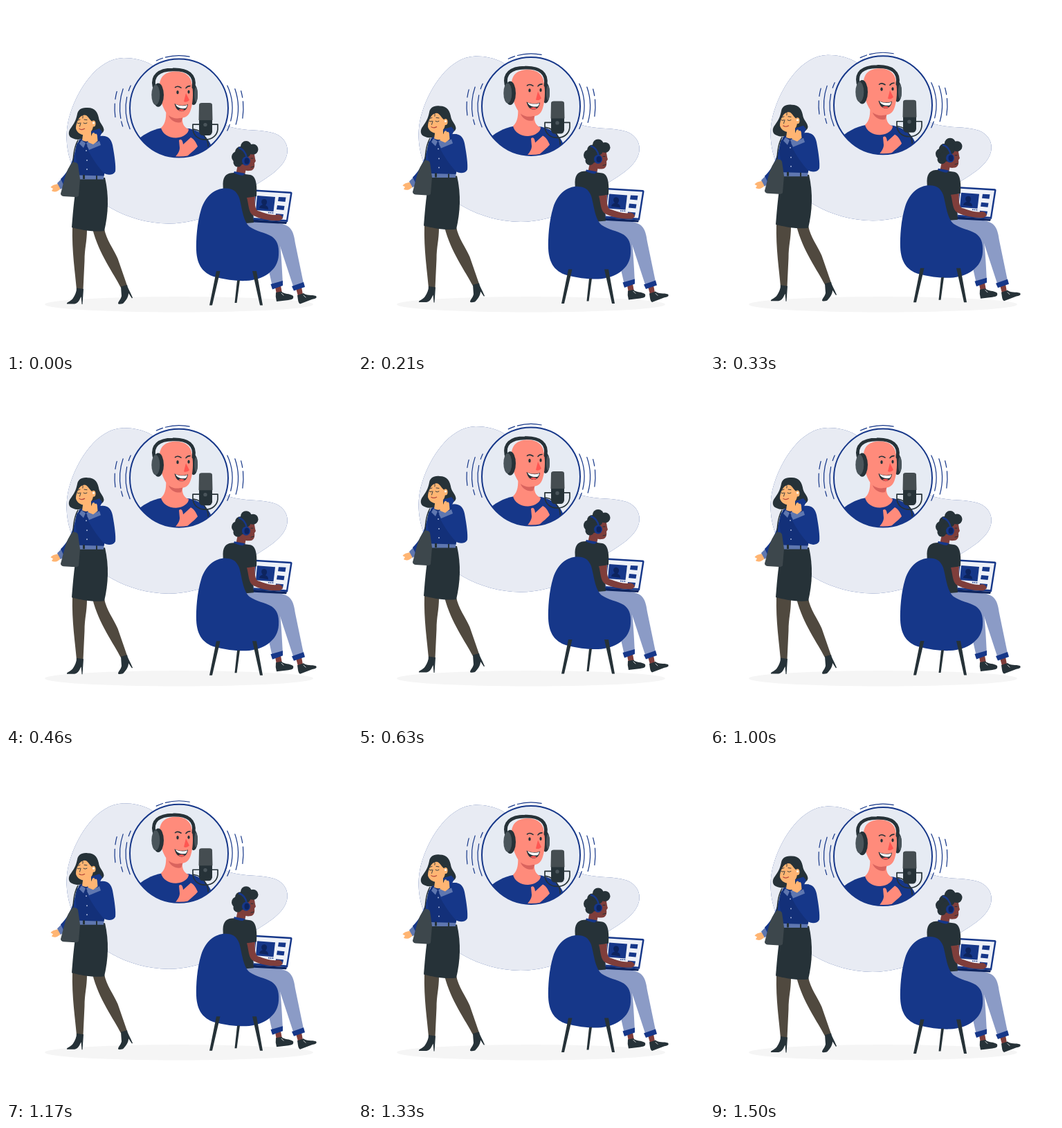
An HTML page for the animation above (1540 ms loop, 500x500 px).

```html
<!DOCTYPE html>
<html lang="en">
<head>
<meta charset="utf-8">
<title>Podcast listeners</title>
<style>
html, body { margin: 0; width: 100%; height: 100%; overflow: hidden; background: #fff; }
svg { display: block; width: 100vw; height: 100vh; }
.blue { fill: #163789; }
.shade { fill: #133079; }
.navy { fill: #0d245f; }
.dark { fill: #263238; }
.gray { fill: #4a555b; }
.cuff { fill: #5f77b0; }
.pants { fill: #8b9bc6; }
.tights { fill: #50493f; }
.pink { fill: #ff8b7b; }
.tan { fill: #ffb573; }
.brown { fill: #7f3e3b; }
.line { fill: none; stroke: #263238; stroke-linecap: round; stroke-linejoin: round; }
.lace { fill: none; stroke: #fff; stroke-width: .8; stroke-linecap: round; }
#waves { fill: none; stroke: #163789; stroke-width: 1.2; stroke-linecap: round; }
</style>
</head>
<body>
<svg viewBox="0 0 500 500">
  <defs>
    <clipPath id="disc"><circle cx="250" cy="147.500" r="71"/></clipPath>
    <path id="blob" d="M170 75C185 75 197 78 207 83C248 105 285 162 325 175C345 181 371 178 388 184C404 190 409 204 406 215C400 238 372 250 350 266C320 292 285 314 235 314.500C175 314 121 281 101 243C86 214 84 182 93 155C104 121 131 76 170 75Z"/>
  </defs>
  <ellipse cx="250" cy="431.300" rx="194" ry="11.200" fill="#f5f5f5"/>

  <g id="scene">
    <use href="#blob" class="blue"/>
    <use href="#blob" fill="#fff" opacity=".9"/>
    <path id="waves"/>

    <!-- host -->
    <circle cx="250" cy="147.500" r="71" fill="#e6ebf3"/>
    <g clip-path="url(#disc)">
      <path class="blue" d="M185 198C197 186 210 179 226 176L265 177C281 181 292 189 297 203L302 225H180Z"/>
      <path class="pink" d="M231 146C232 160 231 170 224 176C226 185 236 191 246 190.500C256 190 264 184 264 178C256 175 254 168 255 158Z"/>
      <path d="M235 158C241 163 250 164 256 160L253 168C246 170 237 165 235 158Z" fill="#d9645e"/>
      <ellipse class="dark" cx="271" cy="128" rx="6" ry="15"/>
      <ellipse class="gray" cx="274.500" cy="128" rx="2.400" ry="11"/>
      <path class="pink" d="M222 115C222 101 232 94.500 245 94.500C260 94.500 268 102 269 115C271 126 270 141 267 150C264 160 258 162.500 250 161.500C240 160 232 157 229 150C224 140 222 130 222 115Z"/>
      <path class="line" stroke-width="4.800" d="M214 116C211 101 220 92 241 91.800C263 91 274 100 271 117"/>
      <ellipse class="dark" cx="220" cy="128.500" rx="8" ry="17.200"/>
      <ellipse class="gray" cx="216.300" cy="128.500" rx="6" ry="14.500"/>
      <ellipse class="dark" cx="248" cy="124.500" rx="1.700" ry="2.700"/>
      <ellipse class="dark" cx="264" cy="124" rx="1.600" ry="2.600"/>
      <path class="line" stroke-width="1.600" d="M244.500 117.500Q248 114.500 253 118M260 118.500Q262 115.500 266 115.500"/>
      <path d="M260 126L265 136Q261 140 257 138Z" fill="#ff5652"/>
      <path class="dark" d="M243.500 141C250 144 257 144.500 263 142C262 149 258 153 252 152C247 150.500 245 147 243.500 141Z"/>
      <path d="M245 142C251 144.500 257 145 262 143C261.500 146 260 148 258 148C252 148.500 247 146.500 245 142Z" fill="#fff"/>
      <path d="M249 150C253 148 257 149 258 150.500C256 152.500 252 152.500 249 150Z" fill="#ff5652"/>
      <path class="line" stroke-width="1.700" d="M279 171H270V178C271 188 279 193 288 193C298 193 305 187 306 178V171H298"/>
      <path class="line" stroke-width="1.700" d="M271 178C281 179 286 185 290 193Q293 199 292 207"/>
      <path class="dark" d="M279 163H298V182Q297 187 293 187H284Q280 187 279 182Z"/>
      <path d="M279 143Q279 140 283 140H294Q298 140 298 143L298.500 165H278.500Z" fill="#454d51"/>
      <circle class="gray" cx="288" cy="171.500" r="2.700"/>
      <path class="pink" d="M250 194C253 191 255.500 194 256 200L267 190C272 192 275 198 277 203C273 208 266 213 260 219H244C248 214 251 210 251 205Z"/>
    </g>
    <circle cx="250" cy="147.500" r="71" fill="none" stroke="#163789" stroke-width="2"/>

    <!-- walking listener -->
    <path class="tights" d="M96 319L117 323C117 341 113.500 350 113.500 368L111.500 410H102C100 385 95 355 96 319Z"/>
    <path class="tights" d="M123 322L142 322C145 338 155 350 161.500 365L175 404L166 407C156 387 134 358 125 322Z"/>
    <path class="dark" d="M102 407.500L112 409L110.500 431H109.500L108.500 420C106 425 104 430 99 430.500H88C87 428 94 427 97 422C100 417 102 413 102 407.500Z"/>
    <path class="dark" d="M166 405.500L175 403C176 408 179 412 183 421.500L182 422.300L177 415C177 421 173 426 169 430C166 431 162 431 162 430C162 427 166 424 167 419Z"/>
    <path class="tan" d="M78 256C73 258 67 258 64.500 262L68 264L66 267C70 270 75 268 79 264Z"/>
    <path class="cuff" d="M74 256L79 265L86 259L80 250Z"/>
    <path class="blue" d="M103 196C99 212 96 234 79 250L85 262C96 252 106 240 111 220Z"/>
    <path class="dark" d="M118 147C109 146 104 150 103 156C101 166 98 170 94 176C89 182 90 189 96 191C102 194 110 193 116 190L128 187C134 188 141 184 141.500 179C141 173 136 170 134.500 164C133 154 129 147 118 147Z"/>
    <path class="shade" d="M106 193C112 190 132 187 143 188L146 225L141 248H105C104 234 99 217 101 204Z"/>
    <path class="tan" d="M112 180L123 178L123 193Q117 198 110 194Z"/>
    <path class="tan" d="M104 165C107 159 112 156 116 158C120 161 122 166 126 168C127 176 124 183 117 186C110 188 102 183 101 177C101 172 102 169 104 165Z"/>
    <ellipse class="tan" cx="126.500" cy="170" rx="3" ry="4.500"/>
    <path class="line" stroke-width=".9" d="M103 169Q105 170.500 107 169M112 169Q114 171 117 169M104 165L107 164M113 164L117 164.500M108 169L106.500 174M110 156Q112 160 111 162"/>
    <path d="M105.500 177Q109 180 114 177" fill="none" stroke="#b5483b" stroke-width="1.200"/>
    <circle cx="126.500" cy="169" r="1.500" fill="#fff"/>
    <path class="cuff" d="M109 194L115 198L112 205L106 199ZM116 198L124 192L128 199L119 205Z"/>
    <path class="blue" d="M136 188C146 186 152 191 154 201C157 217 159 232 158 239C155 245 146 245 141 241C133 232 124 220 118 207L134 200Z"/>
    <path class="cuff" d="M117 202L135 195L137 201L120 208Z"/>
    <path class="blue" d="M123 181L135 177L139 182L132 197L126 195Z"/>
    <path class="tan" d="M118 194C121 191 123 189 124 186C125 182 128 182 128.500 185C131 183 132 186 132 189L132.500 195L126 200L119 197Z"/>
    <g fill="#aab8dc"><circle cx="116" cy="209" r="1"/><circle cx="117" cy="223" r="1"/><circle cx="117" cy="236" r="1"/></g>
    <path class="dark" d="M104 248H143C149 274 148 300 142 325C124 327 107 323 95 320C97 295 99 270 104 248Z"/>
    <path class="cuff" d="M105 244.500L141 245.500V250.500H104.500Z"/>
    <path class="dark" d="M111 244H114V250H111ZM130 245H132V251H130Z"/>
    <path class="line" stroke-width="1.500" d="M104 194C98 204 97 216 97 230"/>
    <path d="M96 226C99 225 103 226 104 229L107 250L105 274Q104 276 100 276L83 275Q79 274 79 271C84 254 86 237 96 226Z" fill="#3d474c"/>

    <!-- seated listener -->
    <path class="pants" d="M372 325L396 345C398 362 399 382 400 401L385 405.500L377 370Z"/>
    <path class="pants" d="M345 309C360 312 385 312 399 315C413 318 416 328 418 343L430 401L415 405L396 347C397 363 387 374 370 374L350 335Z"/>
    <path class="brown" d="M389 406L397 404L399 415L391 417ZM419 408L427 406L429 417L422 419Z"/>
    <path class="blue" d="M382.500 402L400 397V404L385 409.500ZM413 405L430 399L432 406L416 411.500Z"/>
    <path class="dark" d="M390 414L398 412.500C402 417 410 415 415 419C416 423 414 424 408 425L391 427Q389 420 390 414ZM421 418L430 415C434 419 442 417 448 419C450 422 447 423 442 424L425 430.500C422 429 422 424 421 418Z"/>
    <path class="lace" d="M398 415L401 418M430 418L433 421"/>

    <path class="blue" d="M361 265.500L412 268.500Q414 269 413.500 271L407 312L357 309Z"/>
    <path d="M362 268L411 271L405 309L358 306Z" fill="#eef1f8"/>
    <path class="blue" d="M363 274L389 276L386.500 297L361 295Z"/>
    <path class="navy" d="M366 292C367 288 369 288 371 287C367 283 370 278 374 279C378 280 378 285 375 288C378 289 379 291 379 294Z"/>
    <path class="blue" d="M394 276L404.500 276.500L403.500 283L393 282ZM392 288L402.500 289L401.500 295L391 294ZM390 300L401 301L400 306L389.500 305Z"/>
    <path d="M379 298.500L387 299" stroke="#163789" stroke-width="1.500" stroke-dasharray="1.500 1" fill="none"/>
    <path class="navy" d="M349 308L406 312L405 315L349 312Z"/>

    <path class="brown" d="M335 229L348 231L345 244H332Z"/>
    <path class="brown" d="M343 208L357 210C360 215 359 218 361 224L359 227C360 233 358 238 352 238C346 239 340 235 338 229Z"/>
    <g class="dark">
      <circle cx="347" cy="203" r="8"/><circle cx="357" cy="207" r="7.500"/><circle cx="339" cy="211" r="8"/>
      <circle cx="334" cy="218" r="8"/><circle cx="335" cy="226" r="6.500"/><circle cx="346" cy="211" r="8"/><circle cx="341" cy="221" r="8"/>
    </g>
    <path d="M336 205C342 206 347 212 348 220" fill="none" stroke="#163789" stroke-width="2.500"/>
    <ellipse class="blue" cx="347" cy="224" rx="6" ry="6.500"/>
    <ellipse class="navy" cx="348" cy="224" rx="3.500" ry="4.500"/>
    <path class="line" stroke-width="1" d="M354 220H357M354 233L358 232"/>
    <path class="dark" d="M330 241C319 241 314 245 313.500 257C313 274 322 298 335 315L358 313L355 277L362 275C363 260 362 246 353 244Z"/>
    <path class="blue" d="M330 239L346 242L342 245Q334 244 329 241Z"/>
    <path class="brown" d="M348 277L360 275.500C359 285 360 294 364 296C373 299 382 302 389 302C394 300 399 302 400 307L396 310C385 311 367 308 358 303C350 299 351 287 348 277Z"/>

    <path class="blue" d="M318 263.500C303 263 289 273 282 294C276 313 274.500 338 275 353C276 376 286 386 300 391C318 396 335 397.500 347 397C372 396 393 382 394 360C395 345 391 338 384 333C374 327 362 326 352 319C342 310 341 290 337 277C333 267 327 263.500 318 263.500Z"/>
    <path class="dark" d="M304 383H309.500L298 432.500H294ZM334 396.500L338 396L333.500 429H330.500ZM356 383H362L371 432.500H367Z"/>
  </g>
</svg>
<script>
const LOOP = 1540, FRAMES = 37, STEP = LOOP / FRAMES;
const RISE = 10, LOWEST = 1500, REST = 0.6;
const CX = 250, CY = 147.5;
const scene = document.getElementById('scene');

// Arc around the disc; angles in degrees, clockwise from the right
function arc([r, from, to]) {
  const at = deg => {
    const a = deg * Math.PI / 180;
    return (CX + r * Math.cos(a)).toFixed(2) + ' ' + (CY + r * Math.sin(a)).toFixed(2);
  };
  return `M${at(from)}A${r} ${r} 0 0 1 ${at(to)}`;
}

const waves = [
  [77, 199, 205], [77, 157, 192], [85.5, 162, 167], [85.5, 170, 199], [93, 172, 184], [93, 188, 195],
  [77, -25, 14], [77, 18, 25], [85.5, -19, 16], [93, -15.5, -9.5], [93, -6, 9],
  [76, -105, -78.5], [76, -115.5, -108]
];
document.getElementById('waves').setAttribute('d', waves.map(arc).join(''));

// Even rise and fall, stepped at the animation's own rate
function draw(t) {
  const tick = Math.floor((t % LOOP + 4) / STEP) % FRAMES;
  const phase = (tick * STEP - LOWEST + LOOP) % LOOP / LOOP;
  const lift = RISE * (1 - Math.abs(1 - 2 * phase));
  scene.setAttribute('transform', `translate(0 ${(REST - lift).toFixed(3)})`);
}

let start;
function loop(now) {
  start ??= now;
  draw(now - start);
  requestAnimationFrame(loop);
}
draw(0);
requestAnimationFrame(loop);
</script>
</body>
</html>
```
